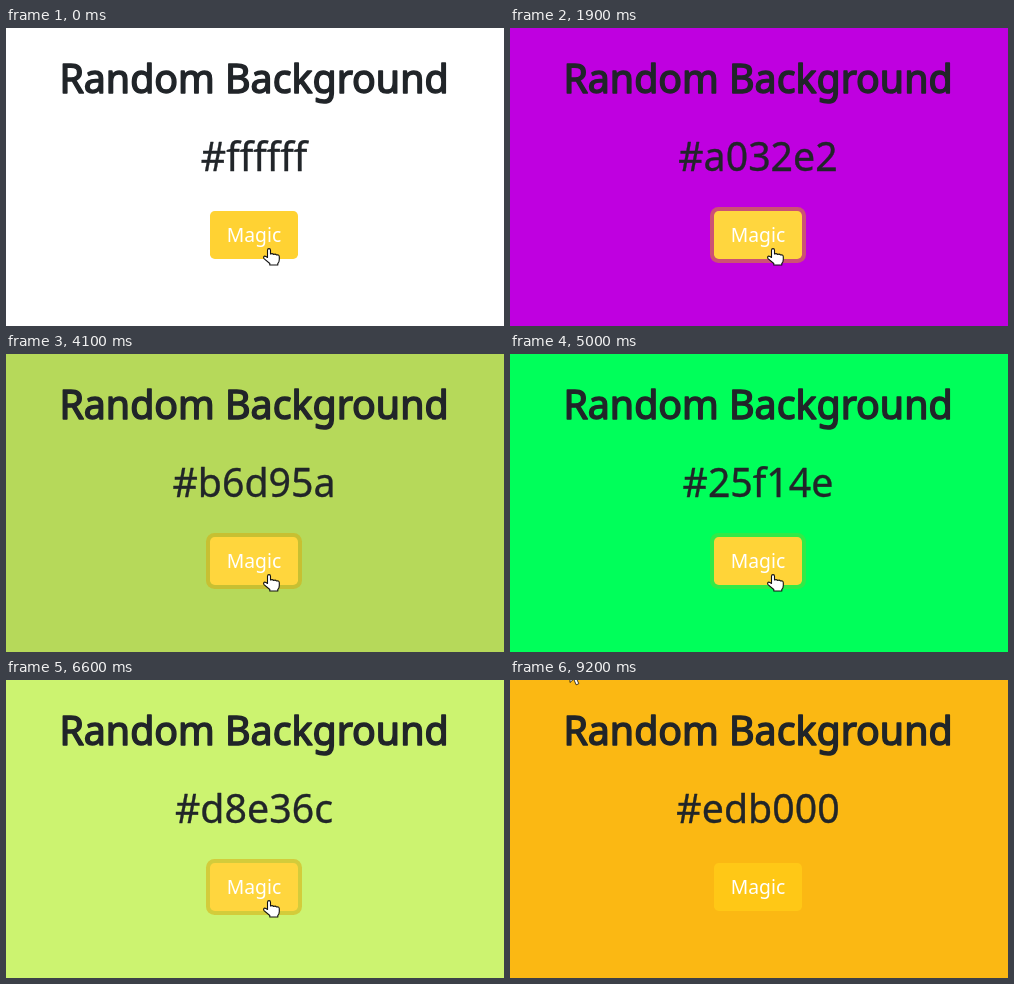
Write an HTML page that moves like this. It is 498 px wide and 298 px high and loops after 9.3 s.

```html
<!DOCTYPE html>
<html lang="en">
<head>
<meta charset="utf-8">
<title>Random Background</title>
<style>
  html, body { margin: 0; height: 100%; overflow: hidden; }
  svg { display: block; width: 498px; height: 298px; background: #fff; }
  text { font-family: "Noto Sans", "Open Sans", sans-serif; text-anchor: middle; fill: #212529; }
  .heavy { stroke: #212529; stroke-linejoin: round; font-variant-ligatures: none; }
  .cursor path { fill: #fff; stroke: #111; stroke-width: 1.1; stroke-linejoin: round; }
</style>
</head>
<body>
<svg id="page" viewBox="0 0 498 298">
  <text class="heavy" x="248" y="65" font-size="39.3" stroke-width="1.5">Random Background</text>
  <text class="heavy" id="code" x="248" y="143" font-size="39.3" stroke-width=".35"></text>
  <rect id="ring" x="200" y="179" width="96" height="56" rx="8.5" fill="#d9a406" fill-opacity=".5"/>
  <rect id="button" x="204" y="183" width="88" height="48" rx="4.8"/>
  <text x="248" y="214" font-size="19.3" style="fill:#fff">Magic</text>
  <g id="hand" class="cursor">
    <path d="M261.5 229.5V222.2Q261.5 220.6 263 220.6T264.5 222.2V226Q266.4 225 267.6 226.4Q269.5 225.5 270.6 227Q273.3 226.3 273.3 229V231.5Q273.3 234 271.8 235.5V237H263.8V235.5L258 230.6Q257 229 258.2 228.2Q259.5 227.8 261.5 229.5Z"/>
  </g>
  <g id="arrow" class="cursor">
    <path d="M0 0V16L3.7 12.6L6.2 18.3L8.8 17.2L6.3 11.6H11.3Z" style="stroke-width:.8"/>
  </g>
</svg>
<script>
const LOOP = 9300, PRESS = 85, RELEASE = 210;
const el = id => document.getElementById(id);
const [page, code, ring, button, hand, arrow] =
  ["page", "code", "ring", "button", "hand", "arrow"].map(el);

// click time, printed code, colour on screen when it differs
const clicks = [
  [-PRESS - RELEASE, "#ffffff"],
  [470, "#5fc3d8"], [970, "#e0795b"], [1470, "#48b07c"],
  [1890, "#a032e2", "#bf00e0"], [2290, "#9ad2c1"],
  [2770, "#d14f88"], [3190, "#25058f", "#400088"], [3470, "#c8a63d"],
  [3770, "#3e8fd0"], [4070, "#b6d95a"],
  [4470, "#8a5a3c"], [4890, "#25f14e", "#00ff5a"],
  [5370, "#d06fc4"], [5690, "#4a9c96"], [6070, "#e8905e"],
  [6290, "#d8e36c", "#ccf370"], [6590, "#d8e36c", "#ccf370"], [6990, "#58b3e4"],
  [7480, "#706ca4", "#7a5ca2"], [7870, "#74c96a"],
  [8270, "#edb000", "#fbb813"],
];

const HOVER = [255, 210, 51], ACTIVE = [255, 214, 62], IDLE = [255, 200, 22];
const mix = (a, b, k) => a.map((v, i) => v + (b[i] - v) * k);
const ease = (t, from, to) => {
  const k = Math.min(1, Math.max(0, (t - from) / (to - from)));
  return k * k * (3 - 2 * k);
};
const pressLevel = (t, at) => t < at ? ease(t, at - PRESS, at) : 1 - ease(t, at, at + RELEASE);

function draw(t) {
  const [, label, shade = label] = clicks.findLast(([at]) => at <= t);
  code.textContent = label;
  page.style.background = shade;

  const level = Math.max(...clicks.map(([at]) => pressLevel(t, at)));
  ring.setAttribute("opacity", level);
  const rest = mix(HOVER, IDLE, ease(t, 8960, 9190));
  button.setAttribute("fill", `rgb(${mix(rest, ACTIVE, level).map(Math.round)})`);

  const leave = ease(t, 8520, 8790);
  const [x, y] = mix([262, 220], [60, -13.5], leave);
  const onButton = x > 204 && y > 183;
  hand.setAttribute("transform", `translate(${x - 262} ${y - 220})`);
  arrow.setAttribute("transform", `translate(${x} ${y})`);
  hand.style.display = onButton ? "" : "none";
  arrow.style.display = onButton ? "none" : "";
}

const start = performance.now();
function tick() {
  draw((performance.now() - start) % LOOP);
  requestAnimationFrame(tick);
}
tick();
</script>
</body>
</html>
```
